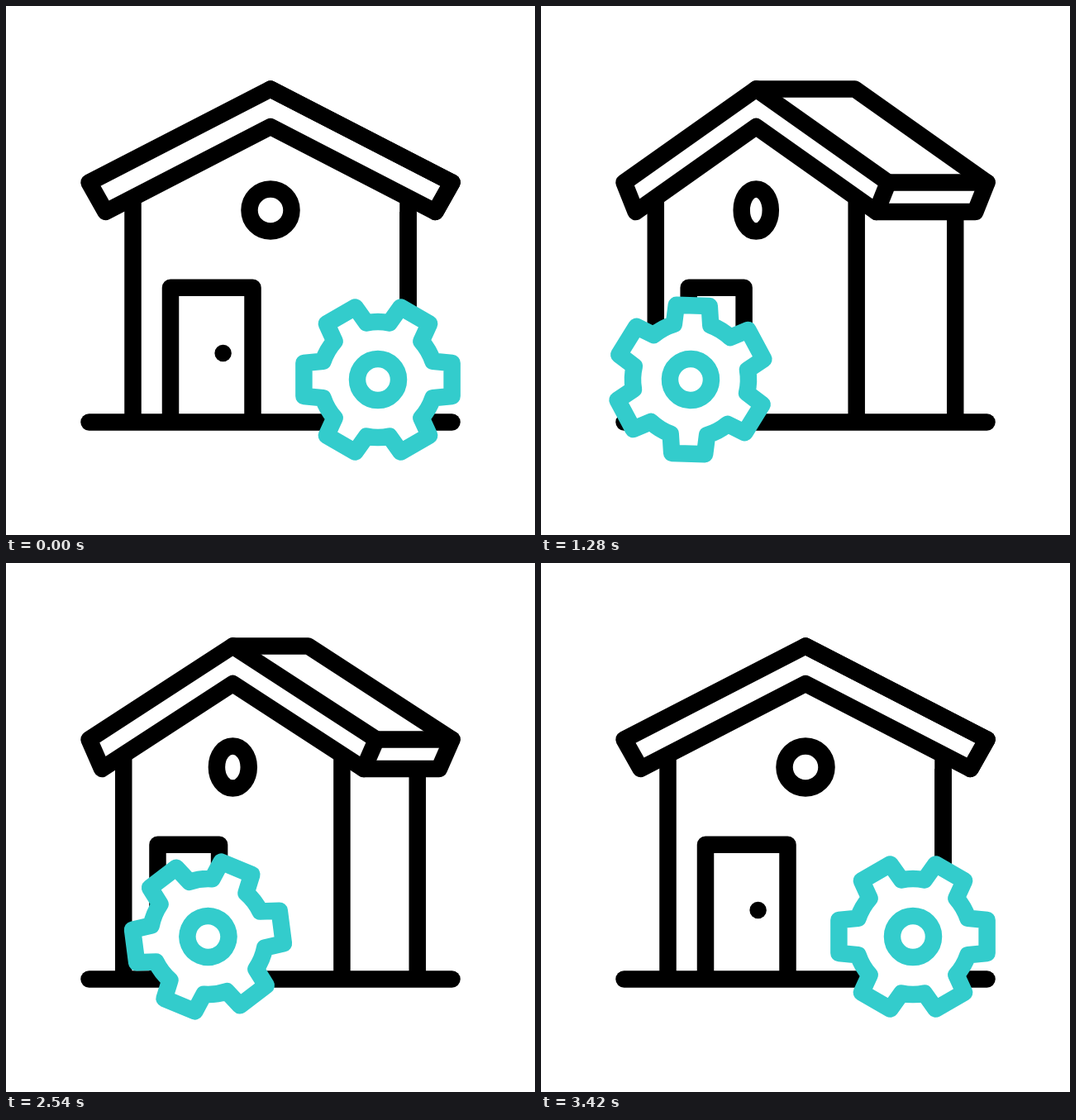
An HTML page with a canvas that plays this animation: 640x640 px, repeating every 3.6 s.

```html
<!DOCTYPE html>
<html lang="en">
<head>
<meta charset="utf-8">
<title>House and gear</title>
<style>
  html, body { margin: 0; width: 100%; height: 100%; overflow: hidden; background: #fff; }
  canvas { display: block; width: 640px; height: 640px; }
</style>
</head>
<body>
<canvas id="stage" width="640" height="640"></canvas>
<script>
const ctx = document.getElementById('stage').getContext('2d');
const LOOP = 3600, STEP = 20;
const START = 206, SPAN = 1602;
const BLACK = '#000', TEAL = '#33cccc';
const EAVE = 213.5, SOFFIT = 249, RIDGE = 100.5, GROUND = 503.5;

// Symmetric cubic Bezier easing, solved by bisection
function ease(x) {
  if (x <= 0) return 0;
  if (x >= 1) return 1;
  const a = 0.81;
  let lo = 0, hi = 1, w = 0.5;
  for (let i = 0; i < 30; i++) {
    const v = 1 - w;
    const bx = 3 * a * w * v * v + 3 * (1 - a) * w * w * v + w * w * w;
    if (bx < x) lo = w; else hi = w;
    w = (lo + hi) / 2;
  }
  return w * w * (3 - 2 * w);
}

function progress(t) {
  return ease((t - START) / SPAN) - ease((t - START - SPAN) / SPAN);
}

function line(points, closed) {
  ctx.beginPath();
  for (const [x, y] of points) ctx.lineTo(x, y);
  if (closed) ctx.closePath();
  ctx.stroke();
}

function ring(x, y, rx, ry) {
  ctx.beginPath();
  ctx.ellipse(x, y, rx, ry, 0, 0, 2 * Math.PI);
  ctx.stroke();
}

function drawHouse(p) {
  ctx.strokeStyle = ctx.fillStyle = BLACK;
  const apex = 320 - 66.2 * p;
  const backApex = 320 + 66.2 * p;
  const mirror = x => 2 * apex - x;
  const left = 100.5, right = 539.5;
  const lowLeft = 120.5 - 6.5 * p;
  const lowRight = 519.5 + 6.5 * p;
  const wall = 153.5 - 16.3 * p;
  const backWall = 486.5 + 16.3 * p;

  // Side of the house
  line([[apex, RIDGE], [backApex, RIDGE], [right, EAVE], [lowRight, SOFFIT], [mirror(lowLeft), SOFFIT]]);
  line([[mirror(left), EAVE], [right, EAVE]]);

  // Gable
  line([
    [apex, RIDGE], [left, EAVE], [lowLeft, SOFFIT],
    [apex, 146], [mirror(lowLeft), SOFFIT], [mirror(left), EAVE]
  ], true);

  ctx.lineCap = 'butt';
  line([[wall, 235], [wall, GROUND]]);
  line([[mirror(wall), 235], [mirror(wall), GROUND]]);
  line([[backWall, SOFFIT], [backWall, GROUND]]);

  // Door
  const doorL = 199 - 22.5 * p, doorR = 298.5 - 58.6 * p;
  line([[doorL, GROUND], [doorL, 340.7], [doorR, 340.7], [doorR, GROUND]]);
  ctx.beginPath();
  ctx.arc(262.6 - 45 * p, 420, 10.25, 0, 2 * Math.PI);
  ctx.fill();

  ring(apex, 247, 25.5 - 8.8 * p, 25.6);

  ctx.lineCap = 'round';
  line([[left, GROUND], [right, GROUND]]);
}

function drawGear(p) {
  const rad = Math.PI / 180;
  ctx.save();
  ctx.translate(450 - 298 * p, 452);
  ctx.rotate(-97.7 * p * rad);
  ctx.strokeStyle = TEAL;
  ctx.fillStyle = '#fff';
  const tip = Math.hypot(89.6, 20), tipA = Math.atan2(20, 89.6);
  const root = 70, rootA = 18.5 * rad;
  ctx.beginPath();
  for (let i = 0; i < 6; i++) {
    const a = i * 60 * rad;
    ctx.arc(0, 0, root, a - 60 * rad + rootA, a - rootA);
    for (const b of [a - tipA, a + tipA]) ctx.lineTo(tip * Math.cos(b), tip * Math.sin(b));
  }
  ctx.closePath();
  ctx.fill();
  ctx.stroke();
  ring(0, 0, 25, 25);
  ctx.restore();
}

function draw() {
  const t = Math.floor((performance.now() % LOOP) / STEP) * STEP;
  const p = progress(t);
  ctx.fillStyle = '#fff';
  ctx.fillRect(0, 0, 640, 640);
  ctx.lineWidth = 20.5;
  ctx.lineCap = ctx.lineJoin = 'round';
  drawHouse(p);
  drawGear(p);
  requestAnimationFrame(draw);
}
draw();
</script>
</body>
</html>
```
